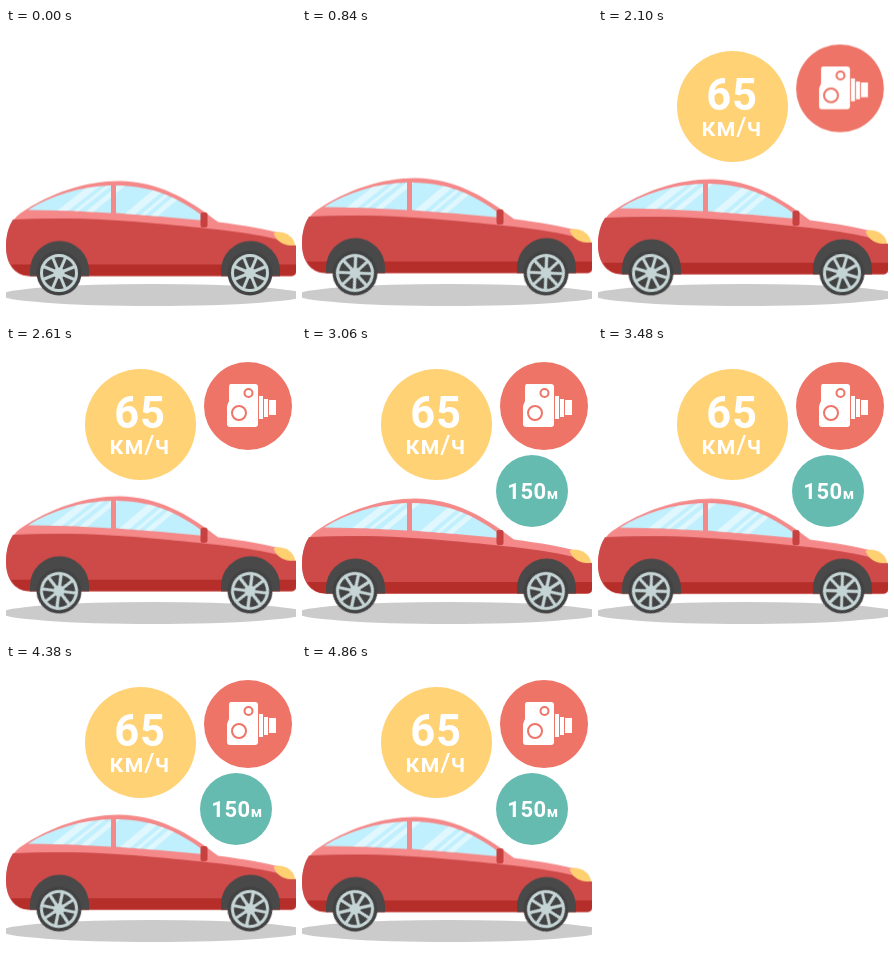
Animation of 290 by 290 pixels, one loop 4930 ms. Source, as an HTML page without scripts:

```html
<!DOCTYPE html>
<html lang="ru">
<head>
<meta charset="utf-8">
<title>Car</title>
<style>
  :root { --loop: 4930ms; }
  html, body { margin: 0; width: 100%; height: 100%; overflow: hidden; background: #fff; }
  svg { display: block; width: 100vw; height: 100vh; }
  text { font-family: Roboto, sans-serif; font-weight: 700; fill: #fff; text-anchor: middle; }

  .badge { transform-box: fill-box; transform-origin: center; animation: var(--loop) infinite both; }
  .speed { animation-name: speed; }
  .camera { animation-name: camera; }
  .distance { animation-name: distance; }
  .wheel { animation: spin calc(var(--loop) / 7) linear infinite; }
  .body { animation: bob calc(var(--loop) / 3) ease-in-out infinite; }
  .glare { animation: glide calc(var(--loop) / 3) ease-in-out infinite; }

  /* Each badge rises from behind the car, then stays until the loop ends. */
  @keyframes speed {
    0%, 23% { transform: translateY(125px) scale(0); animation-timing-function: cubic-bezier(.2, .7, .3, 1); }
    31.5%, 100% { transform: none; }
  }
  @keyframes camera {
    0%, 35% { transform: translateY(155px) scale(0); animation-timing-function: cubic-bezier(.2, .7, .3, 1); }
    43.5%, 100% { transform: none; }
  }
  @keyframes distance {
    0%, 53.5% { transform: translateY(75px) scale(0); animation-timing-function: cubic-bezier(.2, .7, .3, 1); }
    61.5%, 100% { transform: none; }
  }
  @keyframes spin { to { transform: rotate(360deg); } }
  @keyframes bob {
    0%, 100% { transform: translateY(1.5px); }
    50% { transform: translateY(-1.5px); }
  }
  @keyframes glide { 50% { transform: translateX(-7px); } }
</style>
</head>
<body>
<svg viewBox="0 0 290 290">
  <defs>
    <path id="rearGlass" d="M22 180.500C45 166 74 157 105 156V183.500Q64 180.500 22 180.500Z"/>
    <path id="frontGlass" d="M110 156C149 156 178 171 203 191.500Q158 187 110 183.500Z"/>
    <clipPath id="glass"><use href="#rearGlass"/><use href="#frontGlass"/></clipPath>
    <path id="arch" d="M24 246.500V241A29.500 29.500 0 0 1 83 241V246.500Z"/>
    <path id="spokes" d="M-17 0H17M0-17V17"/>
    <g id="wheel">
      <circle r="22.500" fill="#424242"/>
      <g fill="none" stroke="#c5d4d5" stroke-width="3">
        <circle r="17.500"/>
        <use href="#spokes" transform="rotate(22.500)"/>
        <use href="#spokes" transform="rotate(67.500)"/>
      </g>
      <circle r="5.500" fill="#c5d4d5"/>
    </g>
  </defs>

  <ellipse cx="147" cy="267" rx="152" ry="11" fill="#cbcbcb"/>

  <g class="badge speed">
    <circle cx="134.500" cy="78.500" r="55.500" fill="#ffd276"/>
    <text x="134" y="82" font-size="43.500" letter-spacing=".7">65</text>
    <text x="133.500" y="108" font-size="26" letter-spacing=".5" style="font-weight:500">км/ч</text>
  </g>

  <g class="badge camera">
    <circle cx="242" cy="60" r="44" fill="#ee7467"/>
    <g fill="#fff">
      <path d="M225 38H249Q252 38 252 41V78Q252 81 249 81H224Q221 81 221 78V60L223 55V41Q223 38 225 38Z"/>
      <path d="M253 50H257V73H253ZM258 53H262V71H258ZM263 54H270V69H263Z"/>
    </g>
    <g fill="#fff" stroke="#ee7467" stroke-width="2">
      <circle cx="242.500" cy="47" r="4"/>
      <circle cx="233" cy="67" r="7"/>
    </g>
  </g>

  <g class="badge distance">
    <circle cx="230" cy="145" r="36" fill="#65bbb0"/>
    <text x="231" y="153" font-size="22" letter-spacing=".5">150<tspan font-size="15">м</tspan></text>
  </g>

  <g class="body">
    <path fill="#f58989" d="M0 217C0 202 5 191 14 184C45 163 80 151.500 113 151.500C152 152 182 169 212 192.500C238 196 262 200 275 204C284 208 290 215 290 226V245H24C8 245 0 234 0 217Z"/>
    <path fill="#cd4a49" d="M7 190C60 187.500 110 190 150 194C200 198.500 245 203 272 210L290 216V241Q290 246.500 285 246.500H24C8 246.500 0 234 0 217C0 205 3 196 7 190Z"/>
    <path fill="#b62e2a" d="M5 235H290V241Q290 246.500 285 246.500H24Q11 246.500 5 235Z"/>
    <g fill="#c0effd"><use href="#rearGlass"/><use href="#frontGlass"/></g>
    <g clip-path="url(#glass)">
      <g class="glare" stroke="#fff" stroke-opacity=".5" fill="none">
        <path stroke-width="7" d="M48 188L94 152M114 193L158 156"/>
        <path stroke-width="3" d="M62 188L108 152M128 193L172 156"/>
        <path stroke-width="5" d="M74 190L118 154M138 195L182 158"/>
      </g>
    </g>
    <path fill="#f58989" d="M200 184L204 196H198Z"/>
    <rect x="194.500" y="183" width="7" height="15" rx="2" fill="#c74140"/>
    <path fill="#ffd071" d="M267.500 203.500C276 200 288 206 289 215.500C280 218 270 212 267.500 203.500Z"/>
    <g fill="#494949">
      <use href="#arch"/>
      <use href="#arch" x="191"/>
    </g>
  </g>

  <g transform="translate(53 245)"><use class="wheel" href="#wheel"/></g>
  <g transform="translate(244 245)"><use class="wheel" href="#wheel"/></g>
</svg>
</body>
</html>
```
